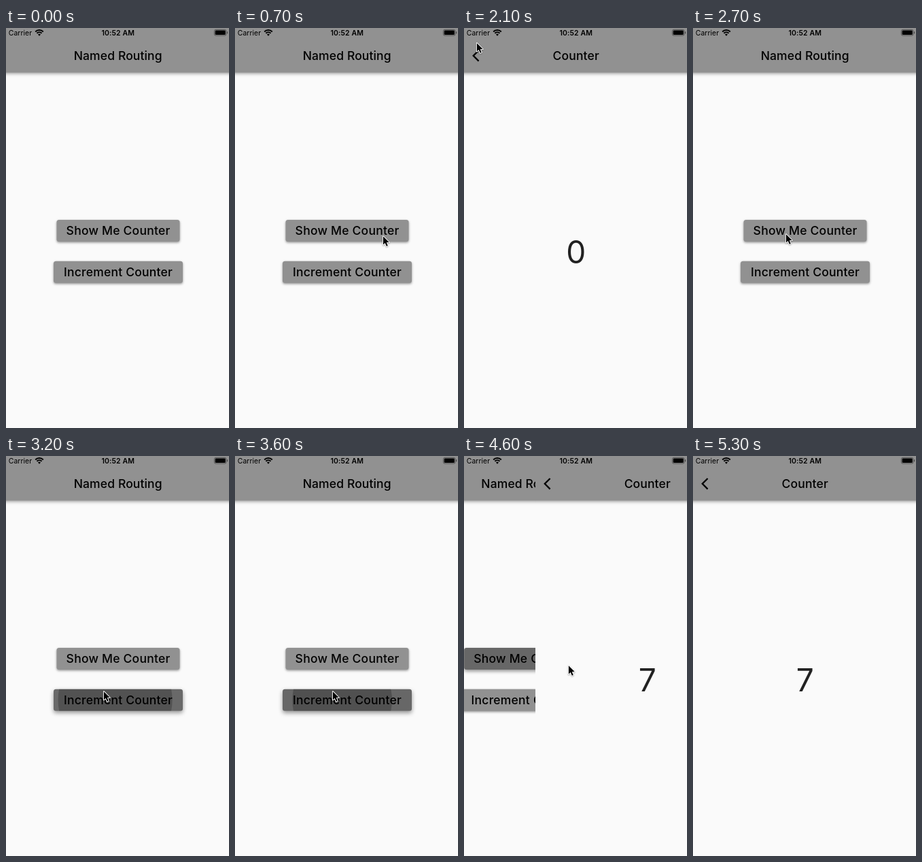
These frames come from a looping animation (328x588 px, 7900 ms). An HTML page with a canvas:

```html
<!DOCTYPE html>
<html lang="en">
<head>
<meta charset="utf-8">
<title>Named Routing</title>
<style>
  html, body { margin: 0; width: 100%; height: 100%; overflow: hidden; background: #fafafa; }
  canvas { display: block; width: 328px; height: 588px; }
</style>
</head>
<body>
<canvas id="stage"></canvas>
<script>
const W = 328, H = 588, MID = 164.7, LOOP = 7900, STEP = 100;
const GREY = '#919191', PAPER = '#fafafa';
const FONT = 'Inter, Roboto, sans-serif';

const canvas = document.getElementById('stage');
const ctx = canvas.getContext('2d');
const dpr = window.devicePixelRatio || 1;
canvas.width = W * dpr;
canvas.height = H * dpr;

const clamp = (v, lo = 0, hi = 1) => Math.min(hi, Math.max(lo, v));
const lerp = (a, b, k) => a + (b - a) * k;
const easeOut = u => 1 - (1 - u) ** 2;
const black = a => `rgba(0,0,0,${a})`;

const SHOW = { y: 282, w: 181, label: 'Show Me Counter', taps: [1000, 4400] };
const ADD = { y: 342.7, w: 190, label: 'Increment Counter',
  taps: Array.from({ length: 7 }, (_, i) => 3080 + 140 * i) };

// Pointer stops, each reached by an eased move
const moves = [
  { from: 0, to: 700, x: 217, y: 305 },
  { from: 1200, to: 1400, x: 202, y: 331 },
  { from: 1400, to: 2000, x: 14, y: 3 },
  { from: 2000, to: 2100, x: 18, y: 21 },
  { from: 2300, to: 2700, x: 136, y: 302 },
  { from: 2700, to: 3000, x: 143, y: 345 },
  { from: 3950, to: 4300, x: 153, y: 307 },
  { from: 4600, to: 5300, x: 328, y: 338 }
];

function pointer(t) {
  let x = 336, y = 356;
  for (const m of moves) {
    const k = easeOut(clamp((t - m.from) / (m.to - m.from)));
    x = lerp(x, m.x, k);
    y = lerp(y, m.y, k);
  }
  return { x, y };
}

function bezier(x1, y1, x2, y2) {
  const axis = (a, b, s) => 3 * (1 - s) ** 2 * s * a + 3 * (1 - s) * s * s * b + s ** 3;
  return t => {
    if (t <= 0 || t >= 1) return clamp(t);
    let lo = 0, hi = 1;
    for (let i = 0; i < 20; i++) {
      const mid = (lo + hi) / 2;
      if (axis(x1, x2, mid) < t) lo = mid; else hi = mid;
    }
    return axis(y1, y2, lo);
  };
}
const glide = bezier(0.35, 0.91, 0.33, 0.97);

// 0 = home page, 1 = counter page
function route(t) {
  const slide = start => glide((t - start) / 360);
  return slide(1046) - slide(2260) + slide(4500);
}

function text(str, x, y, size, weight, spacing = 0, align = 'center', color = '#000') {
  ctx.font = `${weight} ${size}px ${FONT}`;
  ctx.letterSpacing = spacing + 'px';
  ctx.textAlign = align;
  ctx.fillStyle = color;
  ctx.fillText(str, x, y);
}

function shade(alpha, blur, dy) {
  ctx.shadowColor = black(alpha);
  ctx.shadowBlur = blur * dpr;
  ctx.shadowOffsetY = dy * dpr;
}

function box(x, y, w, h, r) {
  ctx.beginPath();
  ctx.roundRect(x, y, w, h, r);
}

function pressLevel(dt) {
  return 0.3 * clamp((dt + 60) / 120) * clamp((640 - dt) / 560);
}

function button({ y, w, label, taps }, t) {
  const x = MID + 0.3 - w / 2, h = 32, cx = x + w / 2;
  const press = Math.max(...taps.map(at => t < at ? 0 : pressLevel(t - at)));
  ctx.save();
  shade(0.42, 3.5 + press * press * 40, 1.6 + press * press * 16);
  box(x, y, w, h, 3.5);
  ctx.fillStyle = GREY;
  ctx.fill();
  ctx.restore();

  ctx.save();
  box(x, y, w, h, 3.5);
  ctx.clip();
  ctx.fillStyle = black(press);
  ctx.fillRect(x, y, w, h);
  for (const at of taps) {
    const dt = t - at;
    if (dt < 0 || dt > 240) continue;
    const grow = dt / 150;
    ctx.beginPath();
    ctx.arc(lerp(pointer(at).x, cx, clamp(grow)), y + h / 2, 20 + 80 * grow, 0, 7);
    ctx.fillStyle = black(0.22 * clamp((240 - dt) / 120));
    ctx.fill();
  }
  ctx.restore();
  text(label, cx, y + 22.3, 17.5, 500, 0.22);
}

function page(x, title, body) {
  ctx.save();
  ctx.translate(x, 0);
  ctx.beginPath();
  ctx.rect(0, 0, W, H);
  ctx.clip();
  ctx.fillStyle = PAPER;
  ctx.fillRect(0, 0, W, H);
  body();
  ctx.save();
  shade(0.5, 5.5, 2);
  ctx.fillStyle = GREY;
  ctx.fillRect(-10, -10, W + 20, 75.4);
  ctx.restore();
  text(title, MID, 46.8, 17.5, 500, 0.13);
  ctx.restore();
}

function home(x, t) {
  page(x, 'Named Routing', () => {
    button(SHOW, t);
    button(ADD, t);
  });
}

function counter(x, t) {
  const count = t < 4400 ? 0 : ADD.taps.length;
  page(x, 'Counter', () => text(count, MID, 346.4, 46, 400, 0, 'center', '#212121'));
  ctx.beginPath();
  ctx.moveTo(x + 21.6, 33);
  ctx.lineTo(x + 13.8, 40.8);
  ctx.lineTo(x + 21.6, 48.6);
  ctx.strokeStyle = '#000';
  ctx.lineWidth = 2.3;
  ctx.stroke();
}

function status() {
  text('Carrier', 3.8, 11, 10.5, 400, 0, 'left');
  text('10:52 AM', MID, 10.8, 10.5, 600, 0.1);

  // Signal fan
  ctx.strokeStyle = ctx.fillStyle = '#000';
  ctx.lineWidth = 2;
  const from = -Math.PI * 0.75, to = -Math.PI * 0.25;
  for (const r of [8.2, 5]) {
    ctx.beginPath();
    ctx.arc(49, 11.3, r, from, to);
    ctx.stroke();
  }
  ctx.beginPath();
  ctx.moveTo(49, 11.8);
  ctx.arc(49, 11.3, 2.7, from, to);
  ctx.fill();

  // Battery
  ctx.lineWidth = 0.8;
  ctx.strokeStyle = black(0.5);
  box(306.4, 2.4, 17.6, 8.8, 2.2);
  ctx.stroke();
  box(307.6, 3.6, 15.2, 6.4, 1.3);
  ctx.fill();
  ctx.fillStyle = black(0.5);
  ctx.fillRect(324.9, 5.3, 1.2, 3);
}

const ARROW = new Path2D('M0 0V12.4L2.8 9.8 4.9 14.6 6.9 13.7 4.9 9.1 8.8 8.9Z');

function arrow({ x, y }) {
  ctx.save();
  ctx.translate(x + 0.9, y + 1.2);
  ctx.lineWidth = 2;
  ctx.lineJoin = 'round';
  ctx.strokeStyle = '#fff';
  shade(0.35, 2, 0.8);
  ctx.stroke(ARROW);
  ctx.shadowColor = 'transparent';
  ctx.fillStyle = '#000';
  ctx.fill(ARROW);
  ctx.restore();
}

function draw(t) {
  ctx.setTransform(dpr, 0, 0, dpr, 0, 0);
  const k = route(t);
  if (k < 1) home(-k * W / 3, t);
  if (k > 0) counter(k > 0.993 ? 0 : (1 - k) * W, t);
  status();
  if (t >= 100 && t < 5300) arrow(pointer(t));
}

const begin = performance.now();
function tick() {
  const t = (performance.now() - begin) % LOOP;
  draw(Math.floor(t / STEP) * STEP);
  requestAnimationFrame(tick);
}
tick();
</script>
</body>
</html>
```
